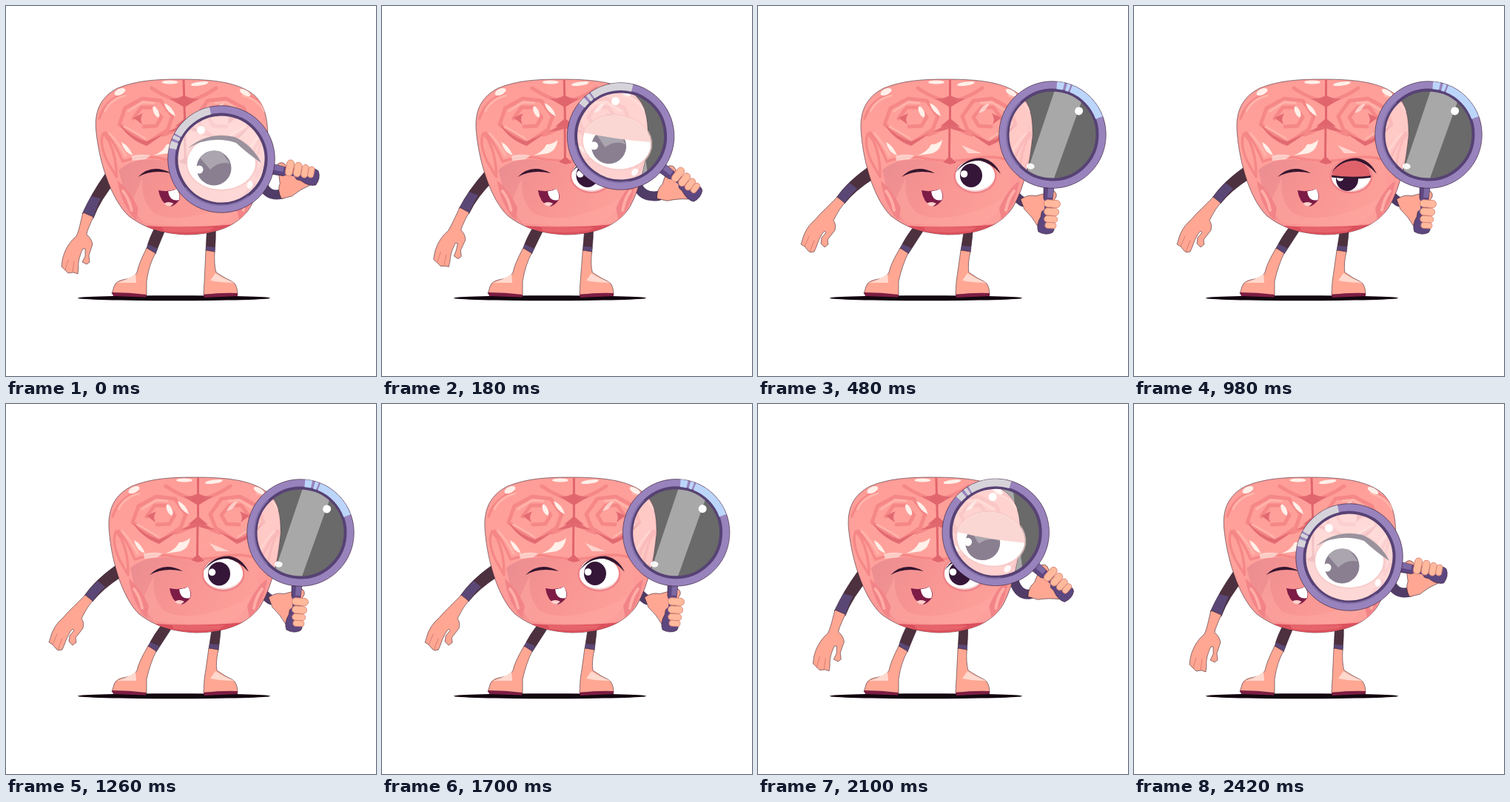
An HTML page that plays this animation: 500 by 500 pixels, repeating every 3420 ms.

```html
<!DOCTYPE html>
<html lang="en">
<head>
<meta charset="utf-8">
<title>Curious brain</title>
<style>
html, body { margin: 0; width: 100%; height: 100%; overflow: hidden; background: #fff; }
svg { display: block; width: 100%; height: 100%; }
.edge { stroke: #2b1222; stroke-width: .7; stroke-opacity: .75; }
.skin { fill: #ffa793; }
.dark { fill: #4d313f; }
.cuff { fill: #5a4775; }
.line { fill: none; stroke-linecap: round; stroke-linejoin: round; }
</style>
</head>
<body>
<svg viewBox="0 0 500 500">
  <defs>
    <linearGradient id="flesh" x1="0" y1="0" x2=".2" y2="1">
      <stop offset="0" stop-color="#ff9c97"/><stop offset=".5" stop-color="#ffa29c"/><stop offset="1" stop-color="#fb9694"/>
    </linearGradient>
    <linearGradient id="cheek" x1="0" y1="0" x2="1" y2=".3">
      <stop offset="0" stop-color="#ea8c91"/><stop offset=".45" stop-color="#f79492"/><stop offset="1" stop-color="#fd9f99"/>
    </linearGradient>
    <path id="shape" d="M139,166 C138,140 148,122 170,111 C197,100 225,99 255,99 C300,99 334,103 355,121 C368,134 371,150 371,172 C369,205 360,245 345,271 C330,295 300,309 256,309 C220,307 200,299 180,284 C155,260 141,205 139,166 Z"/>
    <clipPath id="inBody"><use href="#shape"/></clipPath>
    <clipPath id="inEye"><ellipse cx="293.500" cy="229.500" rx="26.500" ry="21.500"/></clipPath>
    <clipPath id="inBig"><ellipse rx="46" ry="36"/></clipPath>
    <clipPath id="inGlass"><circle id="hole" r="59.500"/></clipPath>
    <g id="half">
      <g class="line" stroke="#f58887">
        <path stroke-width="5" d="M260,130 Q238,126 216,111 M259,157 Q248,169 230,174 M171,160 L179,138 L203,125 L228,128 L243,149 L236,167 L207,186 Z M190,152 L201,137 L217,137 L228,150 L221,162 L204,163"/>
        <path stroke-width="3.500" d="M144,152 Q152,128 178,118 M149,172 Q142,184 153,210 L165,231 Q166,205 156,182 Z M152,171 Q165,187 174,210 Q205,200 230,207 L259,210"/>
      </g>
      <path fill="#e26a71" d="M190,151 L203,145 Q198,153 202,160 Z M171,160 Q188,178 207,183 L232,172 L207,189 Q184,181 171,160 Z M259,152 Q250,166 236,170 Q252,169 260,165 Z M239,125 Q252,126 260,120 V137 Z"/>
      <path class="line" stroke="#ffb4aa" stroke-width="3" d="M184,142 L203,130 L218,131 M178,163 L205,179 M157,172 Q170,186 178,202 M152,142 Q160,126 180,121"/>
      <path fill="#f28488" d="M166,236 Q182,248 193,273 L190,290 Q170,268 166,236 Z"/>
      <path class="line" stroke="#ffada5" stroke-width="4" d="M173,250 Q181,260 184,276"/>
    </g>
    <g id="brain">
      <use href="#shape" class="edge" fill="url(#flesh)"/>
      <g clip-path="url(#inBody)">
        <path fill="url(#cheek)" d="M168,222 Q184,207 214,207 Q240,209 259,214 Q300,203 329,215 Q346,230 340,262 L300,299 H210 L183,284 Z"/>
        <path fill="#ffa8a1" d="M200,232 Q196,262 214,280 Q250,297 318,268 L345,250 L335,292 Q258,301 200,293 L182,270 Z" opacity=".55"/>
        <use href="#half"/>
        <use href="#half" transform="matrix(-1 0 0 1 519 0)"/>
        <path fill="#e0656d" d="M258,99 H261 L261,122 L270,130 L261,136 L261,153 L273,163 L260.500,161 L260,204 L268,212 L259,214 L250,211 L257,205 L257.500,161 L246,163 L258,153 L258,136 L249,130 L258,122 Z"/>
        <g fill="#fff0e9">
          <ellipse cx="241" cy="103" rx="11" ry="2.600"/>
          <ellipse cx="281" cy="105" rx="12" ry="2.600" transform="rotate(-8 281 105)"/>
          <ellipse cx="173" cy="116" rx="8" ry="4" transform="rotate(-25 173 116)"/>
          <ellipse cx="342" cy="117" rx="8" ry="3.500" transform="rotate(30 342 117)"/>
          <ellipse cx="221" cy="143" rx="3.300" ry="8" transform="rotate(-25 221 143)"/>
          <path d="M232,131 Q244,136 247,149 Q235,143 232,131 Z M173,184 Q182,188 188,202 Q176,198 173,184 Z M216,202 Q229,197 234,187 Q242,187 249,181 Q247,195 236,199 Z"/>
          <path opacity=".65" d="M186,203 Q197,199 212,202 L205,207 L187,209 Z M298,145 Q302,134 313,131 Q308,143 298,145 Z M275,188 L302,199 L284,199 Z"/>
        </g>
        <path fill="#db505c" d="M202,297 Q258,301 324,295 L300,312 H220 Z"/>
        <path fill="#f47678" d="M224,299 H296 L288,304 Q254,308 227,304 Z" opacity=".5"/>
      </g>
    </g>
  </defs>

  <ellipse cx="227" cy="394.700" rx="130" ry="3.500" fill="#12060f"/>
  <path id="legL" class="dark edge"/><path id="legR" class="dark edge"/><path id="knees" class="cuff"/>
  <path id="shins" class="skin edge"/>
  <path fill="#ffd9ce" d="M150,374 Q164,370 175,362 L176,374 Z M283,361 L276,371 Q290,374 309,374 Q295,369 283,361 Z"/>
  <path fill="#7c1d43" d="M143,387 Q166,387 190,390 L189,393.500 L145,392 Z M267,390 Q292,387 313,388 L313,392 L268,394 Z"/>

  <path id="upper" class="dark edge"/><path id="cuff" class="cuff"/>
  <path id="fore" class="skin edge"/><path id="fingers" class="line" stroke="#dd7d70" stroke-width="1"/>
  <path id="armR" class="line" stroke="#503c66" stroke-width="13"/>

  <g id="body">
    <use href="#brain"/>
    <path fill="#35162f" d="M194,231 Q213,212 239,226 Q213,220 194,231 Z"/>
    <path fill="#7d1c46" d="M221,249 Q234,252 246,247 Q252,255 249,262 Q242,271 235,271 Q223,265 221,249 Z"/>
    <path fill="#fff" d="M234,250.500 Q241,250 246,247 Q251,255 248.500,262 Q236,265 234,250.500 Z"/>
    <path fill="#ffd0cb" d="M228,267 Q234,263 241,267 L236,271 Q231,270 228,267 Z"/>
    <ellipse cx="293.500" cy="230" rx="29" ry="23.500" fill="#f08387"/>
    <g clip-path="url(#inEye)">
      <rect x="264" y="205" width="60" height="50" fill="#f4d5d6"/>
      <ellipse cx="292.500" cy="227" rx="28" ry="22" fill="#fff"/>
      <g id="iris">
        <ellipse cx="288" cy="229" rx="15" ry="16" fill="#351638"/>
        <circle cx="278.500" cy="227" r="4.800" fill="#fff"/>
      </g>
      <path id="lid" fill="#df626a" stroke="#35162f" stroke-width="2.600"/>
    </g>
    <path fill="#35162f" d="M267,225 Q279,205 302,205.500 Q319,208 328,227 Q315,212 300,209 Q281,208 267,225 Z"/>
  </g>

  <g clip-path="url(#inGlass)">
    <g id="pane">
      <rect x="-65" y="-65" width="130" height="130" fill="#6a6a6a"/>
      <path id="glare" fill="#a8a8a8" d="M7,-72 L49,-72 L-2,70 L-41,70 Z"/>
    </g>
    <g id="seen"><use href="#brain"/><use id="veil" href="#shape" fill="#fff"/></g>
    <g id="big">
      <ellipse rx="48" ry="38" fill="#f5c8c6" opacity=".7"/>
      <g clip-path="url(#inBig)">
        <rect x="-50" y="-40" width="100" height="80" fill="#fff"/>
        <circle cx="-10" cy="7" r="23.500" fill="#8a7f90"/>
        <path fill="#aaa5ae" d="M-29,-7 Q-18,-20 0,-15 L12,1 Q-3,-3 -15,9 Z"/>
        <circle cx="-30" cy="9" r="5.500" fill="#fff"/>
        <path id="bigLid" fill="#fbd7d3"/>
      </g>
      <path id="lash" fill="#9a929d" d="M-45,-20 Q-18,-43 18,-35 Q42,-24 54,0 Q36,-12 20,-27 Q-14,-38 -45,-20 Z"/>
    </g>
  </g>

  <g id="lens">
    <path class="skin edge" d="M79,2 L76,-8 Q82,-15 90,-6 L96,2 L123,4 L124,12 Q113,19 103,31 L90,37 Q82,27 84,17 Z"/>
    <path fill="#5d4780" class="edge" d="M70,-7 L88,-6 L112,-8 Q127,-14 132,-9 Q137,0 132,10 Q123,14 111,8 L88,6 L70,7 Z"/>
    <path fill="#7d68a3" d="M70,-7 L85,-6 V1 H70 Z"/>
    <path class="skin" d="M84,8 L90,17 L108,11 L101,4 L91,4 Z"/>
    <g id="grip" fill="#ffba9d" stroke="#d77d70" stroke-width=".8"></g>
    <circle r="67" fill="none" stroke="#9983bd" stroke-width="10.500"/>
    <circle r="60.500" fill="none" stroke="#574274" stroke-width="4"/>
    <circle r="72.300" fill="none" class="edge"/>
    <path d="M-41,47 A62.500,62.500 0 0 0 46,42" fill="none" stroke="#8470a9" stroke-width="2"/>
    <g id="shine" fill="none" stroke-width="10"></g>
    <circle cx="-34.500" cy="-33.300" r="5.500" fill="#fff"/>
    <ellipse cx="44.600" cy="26.800" rx="4" ry="5.500" fill="#fff" opacity=".9"/>
  </g>
</svg>
<script>
const LOOP = 3420;
const $ = id => document.getElementById(id);
const set = (id, attr, value) => $(id).setAttribute(attr, value);
const mix = (a, b, t) => a + (b - a) * t;
const ramp = (t, start, length) => {
  const x = Math.min(1, Math.max(0, (t - start) / length));
  return x * x * (3 - 2 * x);
};

// Blend two paths that share the same commands
const blend = (a, b, t) => {
  const ends = b.match(/-?[\d.]+/g);
  let i = 0;
  return a.replace(/-?[\d.]+/g, n => mix(+n, +ends[i++], t).toFixed(2));
};

// Each limb: pose with the lens on the eye, pose with the lens aside
const limbs = {
  upper: ['M134,227 Q115,254 103,281 L118,287 Q127,262 150,235 Z',
          'M150,217 Q120,238 106,259 L117,267 Q130,250 158,232 Z'],
  cuff: ['M115,257 Q108,270 103,281 L118,287 Q121,275 128,260 Z',
         'M124,239 Q114,248 106,259 L117,267 Q124,256 134,247 Z'],
  fore: ['M104,279 C101,290 99,303 95,311 C84,320 78,333 76,344 L75,352 L80,357 L84,361 L91,360 L97,362 L98,354 C97,346 100,336 104,328 L107,328 L107,338 L103,346 L109,349 L113,346 L112,337 L117,322 Q115,313 109,309 L110,304 Q114,294 118,285 Z',
         'M107,258 C98,268 84,280 77,289 C68,296 62,307 60,316 L58,322 L63,325 L68,331 L71,333 L76,332 L79,325 C82,316 86,308 90,304 L92,306 L86,313 L85,321 L90,326 L95,322 L94,316 L104,303 Q106,295 102,290 L104,286 Q110,274 117,266 Z'],
  fingers: ['M80,357 L84,343 M90,360 L92,345', 'M63,325 L69,311 M70,332 L76,317'],
  legL: ['M203,296 Q193,314 190,328 L202,335 Q208,319 218,296 Z',
         'M213,295 Q199,312 192,328 L203,335 Q214,318 229,295 Z'],
  legR: ['M272,293 Q271,312 270,331 L282,333 Q284,312 283,293 Z',
         'M280,293 Q277,312 274,331 L287,333 Q290,312 291,293 Z'],
  knees: ['M192,322 L190,328 L202,335 L205,328 Z M271,325 L270,331 L282,333 L283,326 Z',
          'M195,322 L191,328 L203,335 L207,327 Z M275,324 L274,331 L287,333 L288,325 Z'],
  shins: ['M190,327 Q179,349 177,360 Q174,367 163,369 Q148,371 146,379 L143,389 L190,391 L190,372 Q193,350 202,334 Z M270,330 L282,332 Q281,350 284,360 Q296,368 307,373 Q313,378 313,390 L267,390 L268,372 Q269,352 270,330 Z',
          'M192,327 Q179,349 177,360 Q174,367 163,369 Q148,371 146,379 L143,389 L190,391 L190,372 Q195,350 203,334 Z M274,330 L287,332 Q283,350 285,360 Q296,368 307,373 Q313,378 313,390 L267,390 L268,372 Q271,352 274,330 Z']
};

$('grip').innerHTML = [[93, 10, 22], [104, 10, 20], [114, 9, 18], [122.5, 8, 15]].map(([x, w, h], i) =>
  `<rect x="${x - w / 2}" y="${i * 1.2 - 17}" width="${w}" height="${h}" rx="${w / 2}"/>`).join('');

const onRim = deg => {
  const a = deg * Math.PI / 180;
  return `${67 * Math.cos(a)},${67 * Math.sin(a)}`;
};
$('shine').innerHTML = [[-179, -171], [-168, -164], [-162, -114]].map(([a, b]) =>
  `<path d="M${onRim(a)} A67,67 0 0 1 ${onRim(b)}"/>`).join('');

function draw(t) {
  const out = ramp(t, 0, 480);
  const turn = out - ramp(t, 1680, 480);
  const swing = out - ramp(t, 1680, 710);
  const blink = ramp(t, 800, 250) - ramp(t, 1050, 250);

  for (const id in limbs) set(id, 'd', blend(...limbs[id], turn));

  const d = turn - 1;
  const lean = `matrix(1 0 ${-.03 * d} 1 ${22.5 * d} 0)`;
  set('body', 'transform', lean);
  set('seen', 'transform', lean);
  set('iris', 'transform', `translate(0 ${6 * blink})`);
  const y = 203 + 34 * blink;
  set('lid', 'd', `M258,195 H332 V${y - 2} Q296,${y + 5} 258,${y - 2} Z`);
  set('lid', 'visibility', blink > 0 ? 'visible' : 'hidden');

  const s2 = swing * swing;
  const x0 = 291 + 77 * swing + 12 * s2 + 18 * turn;
  const y0 = 207 - 127 * swing + 94 * s2;
  const angle = 11 + 83 * swing;
  const at = `translate(${x0} ${y0})`;
  set('lens', 'transform', `${at} rotate(${angle})`);
  set('pane', 'transform', at);
  set('hole', 'cx', x0);
  set('hole', 'cy', y0);
  set('glare', 'transform', `translate(${100 * s2 * (1 - swing)} 0) rotate(${(angle - 94) / 2})`);
  set('veil', 'opacity', mix(.6, .42, swing));
  const blue = ramp(swing, .35, .35);
  const tint = [[214, 188], [212, 213], [218, 250]].map(c => Math.round(mix(...c, blue)));
  set('shine', 'stroke', `rgb(${tint})`);

  // The magnified eye closes and fades as the lens leaves it
  set('big', 'transform', `translate(${x0 - 50 * s2} ${y0 + 5 + 30 * s2}) rotate(${25 * swing})`);
  set('big', 'opacity', 1 - ramp(swing, .5, .25));
  set('lash', 'opacity', 1 - ramp(swing, .05, .25));
  const cut = -42 + 110 * swing;
  set('bigLid', 'd', `M-50,-45 H50 V${cut} Q0,${cut + 4} -50,${cut} Z`);

  // Right arm reaches from the shoulder to the turning wrist
  const a = angle * Math.PI / 180, c = Math.cos(a), s = Math.sin(a);
  const wx = x0 + 93 * c - 30 * s, wy = y0 + 93 * s + 30 * c;
  set('armR', 'd', `M${mix(346, 344, turn)},${mix(238, 252, turn)} Q352,${mix(259, 261, turn)} ${wx - 4},${wy}`);
}

function tick() {
  draw(performance.now() % LOOP);
  requestAnimationFrame(tick);
}
tick();
</script>
</body>
</html>
```
